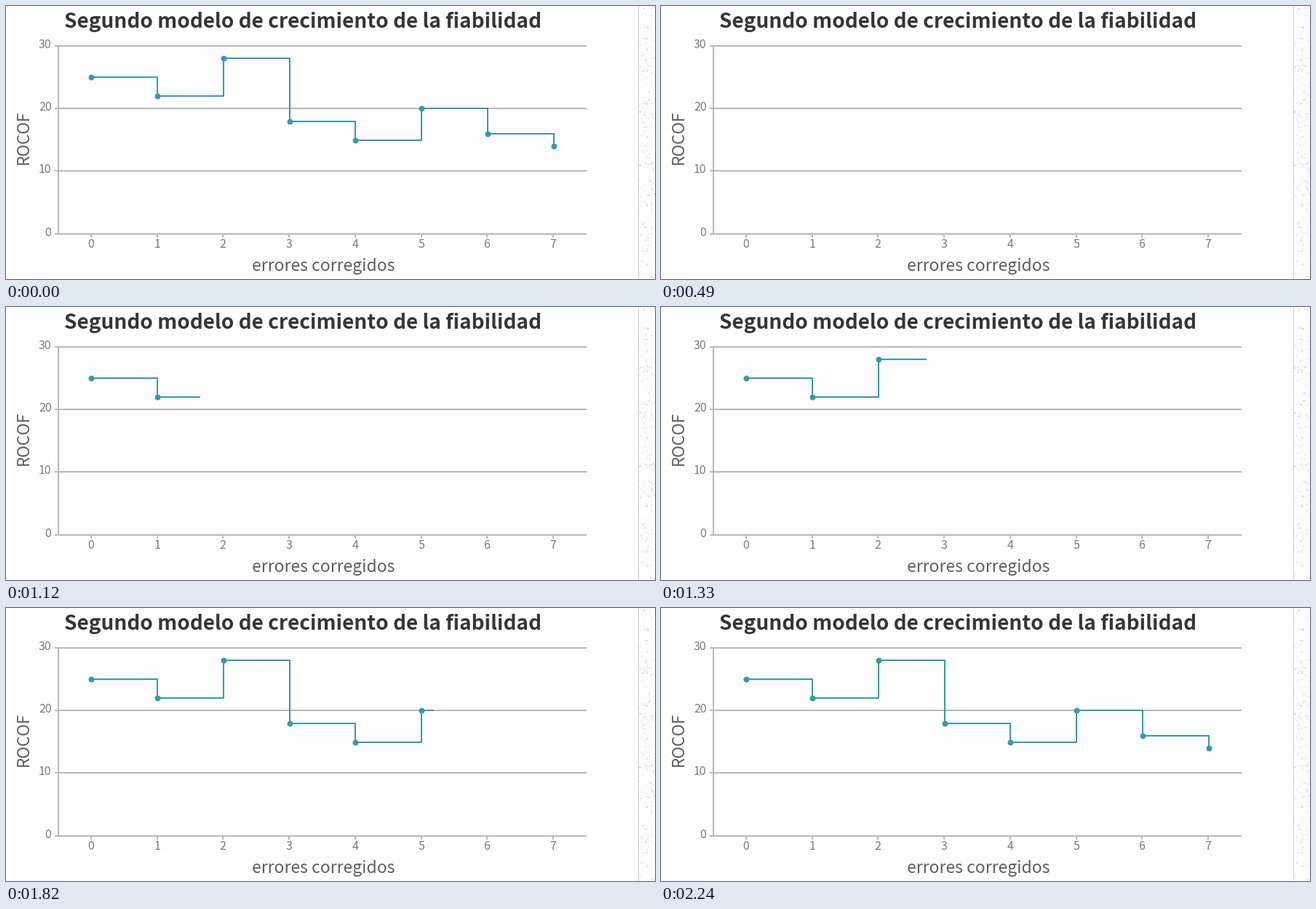
Recreate the animation shown at these times as a matplotlib script. Size 892x376 px, loop 6300 ms.

```python
import numpy as np
import matplotlib.pyplot as plt
from matplotlib.animation import FuncAnimation
from matplotlib.patches import Rectangle

W, H, DPI = 892, 376, 100
STEP, LOOP = 70, 6300
PX = 72 / DPI
GRID, TEAL = "#b9b9b9", "#369aa9"
FONT = "Noto Sans CJK JP"
RATES = [25, 22, 28, 18, 15, 20, 16, 14]
# left-to-right wipe: time in ms, edge in px
WIPE_T = [770, 1120, 1330, 1820, 2100, 2240]
WIPE_X = [117, 267, 365, 588, 719, 790]

fig = plt.figure(figsize=(W / DPI, H / DPI), dpi=DPI, facecolor="#fefefe")
ax = fig.add_axes([0, 0, 1, 1])
ax.set_xlim(0, W)
ax.set_ylim(H, 0)
ax.axis("off")


def px_x(i):
    return 117.3 + 90.75 * i


def px_y(v):
    return 314 - 8.633 * v


def rule(x, y, color=GRID, width=2):
    return ax.plot(x, y, color=color, lw=width * PX,
                   solid_capstyle="butt")[0]


def label(x, y, text, size, color, **kw):
    kw.setdefault("va", "baseline")
    return ax.text(x, y, text, size=size * PX, color=color,
                   family=FONT, **kw)


def speckled_strip():
    rng = np.random.default_rng(8)
    n = 270
    shade = rng.uniform(0.77, 0.97, n)
    ax.scatter(rng.uniform(870, W, n), rng.uniform(0, H, n),
               s=rng.uniform(0.5, 2.2, n) ** 2 * PX ** 2,
               c=np.repeat(shade[:, None], 3, axis=1), lw=0)
    rule([868.5, 868.5], [0, H], "#cbcbcb", 1)


def build_chart():
    parts = [rule([72, 72], [54, 315])]
    for v in (0, 10, 20, 30):
        y = np.floor(px_y(v))
        parts.append(rule([67, 798], [y, y]))
        parts.append(label(62.5, y + 3, str(v), 16, "#7a7a7a", ha="right"))
    for i in range(len(RATES)):
        x = np.floor(px_x(i))
        parts.append(rule([x, x], [314, 319]))
        parts.append(label(x, 333, str(i), 16, "#7a7a7a", ha="center"))
    parts.append(label(408, 30, "Segundo modelo de crecimiento de la \ufb01abilidad",
                       28, "#363636", ha="center", weight="bold"))
    parts.append(label(436, 365, "errores corregidos", 22.9, "#5f5f5f",
                       ha="center"))
    parts.append(label(36, 181, "ROCOF", 22.6, "#5f5f5f", rotation=90,
                       ha="right", va="center"))
    return parts


speckled_strip()
chart = build_chart()
xs = np.round(px_x(np.arange(len(RATES))))
ys = np.round(px_y(np.array(RATES)))
steps = ax.plot(xs, ys, color=TEAL, lw=2 * PX, drawstyle="steps-post",
                zorder=4)[0]
dots = ax.plot(xs, ys, "o", color=TEAL, ms=8 * PX, mew=0, zorder=5,
               snap=False)[0]


def draw(n):
    t = n * STEP
    shown = not 280 <= t < 490
    for part in chart:
        part.set_visible(shown)
    edge = W if t < 280 or t >= 2240 else np.interp(t, WIPE_T, WIPE_X)
    window = Rectangle((0, 0), edge, H, transform=ax.transData)
    for curve in (steps, dots):
        curve.set_visible(t < 280 or t >= 770)
        curve.set_clip_path(window)
    return chart + [steps, dots]


anim = FuncAnimation(fig, draw, frames=LOOP // STEP, interval=STEP,
                     repeat=True, repeat_delay=0)
plt.show()
```
